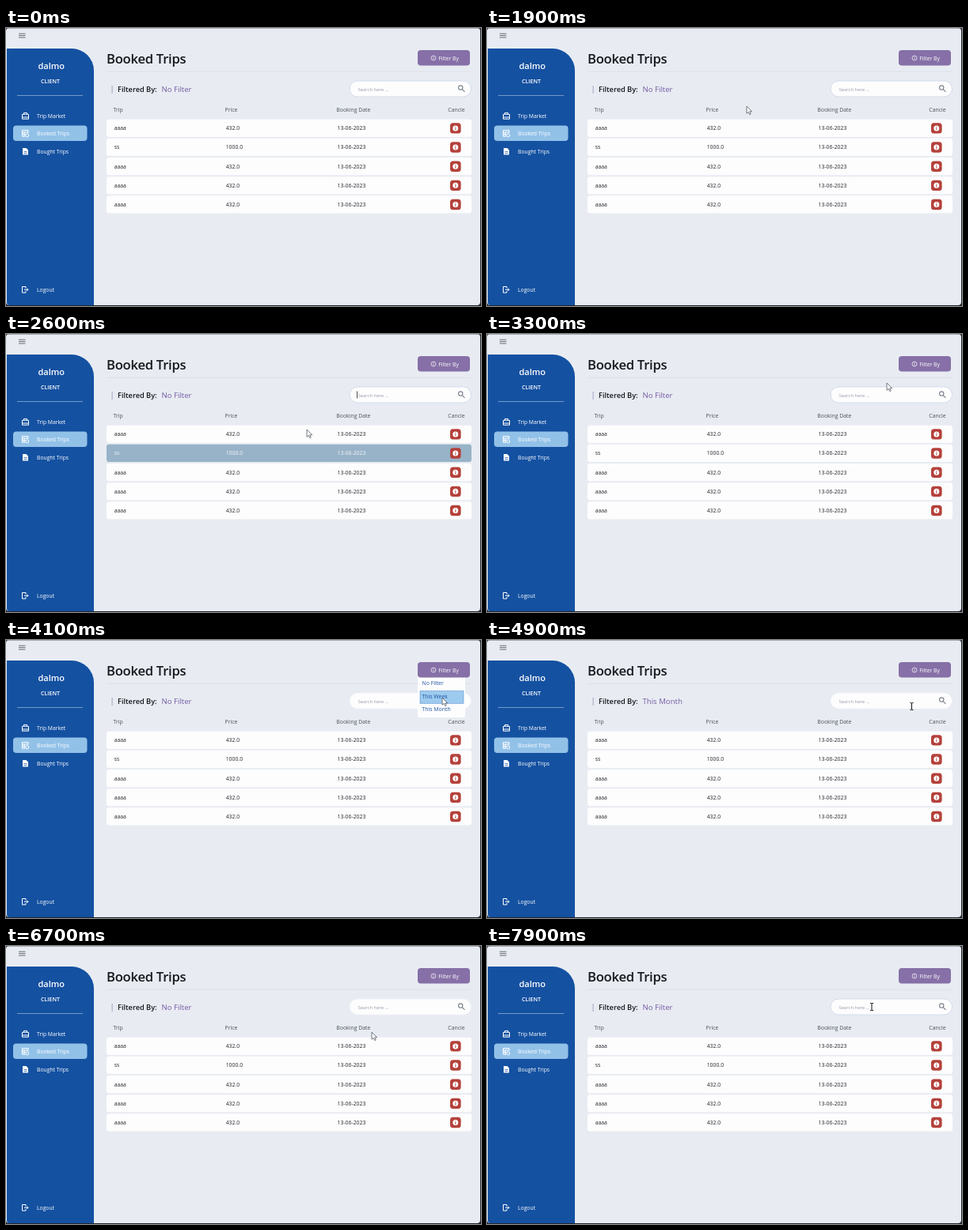
Animation of 600x352 px, one loop 8 s. Source, as an HTML page:

```html
<!DOCTYPE html>
<html lang="en">
<head>
<meta charset="utf-8">
<title>Booked Trips</title>
<style>
  html, body { margin: 0; width: 100%; height: 100%; overflow: hidden; background: #20242c; }
  svg { display: block; width: 600px; height: 352px; font: 6.8px "Open Sans", "Noto Sans", sans-serif; }
  .semi { font-weight: 600; }
  .mid { text-anchor: middle; }
  .icon { fill: none; stroke: #fff; stroke-width: 1; }
  .row rect:first-child { fill: #fdfdfe; }
  .row text { fill: #24262b; }
  .row.hover rect:first-child { fill: #98b3c8; }
  .row.hover text { fill: #f2f6fa; }
</style>
</head>
<body>
<svg viewBox="0 0 600 352">
  <!-- window -->
  <rect width="599" height="351" rx="4" fill="#e8ecf2"/>
  <path d="M0 0H600V.6H0Z" fill="#6b7078"/>
  <path d="M16 7.2h8.5M16 9.6h8.5M16 12h8.5" stroke="#666b73" stroke-width="1"/>

  <!-- sidebar -->
  <path d="M1 26H83A28 28 0 0 1 111 54V351H4Q1 351 1 347Z" fill="#1451a1"/>
  <g fill="#fff">
    <text class="semi mid" x="57.3" y="52" font-size="11">dalmo</text>
    <text class="semi mid" x="56" y="69.6" font-size="7.1">CLIENT</text>
    <path d="M14 85.2H97V85.9H14Z" opacity=".55"/>
    <rect x="9" y="123.5" width="93.5" height="19.5" rx="4" fill="#92c1e8"/>
    <text x="39" y="113.5">Trip Market</text>
    <text x="39" y="136">Booked Trips</text>
    <text x="39" y="158.7">Bought Trips</text>
    <text x="39" y="333.5">Logout</text>
    <path d="M21 152h4.5l2.5 2.5v6h-7Z"/>
  </g>
  <path d="M22.5 156.5h4M22.5 158.6h4" stroke="#1451a1" stroke-width=".7"/>
  <g class="icon">
    <path d="M20.5 109.3h8v5.9h-8ZM22.5 109v-1.6h4V109M20.5 113h8"/>
    <path d="M24 137.2h-3.5v-7.6h7.5v3M20.5 132h7.5M20.5 134.5h4M23 132v5"/>
    <circle cx="26.7" cy="135.9" r="2"/>
    <path d="M25 329.5v-2h-4.5v7.6H25v-2M23 331.3h5M26.3 329.6l1.7 1.7-1.7 1.7"/>
  </g>

  <!-- heading -->
  <text class="semi" x="127" y="45" font-size="16.6" letter-spacing="-.25" fill="#14161b">Booked Trips</text>
  <path d="M127 54.7H587V55.5H127Z" fill="#d8dce4"/>
  <path d="M133.6 73H134.6V83H133.6Z" fill="#a99fc4"/>
  <text class="semi" x="141" y="81" font-size="9.2" fill="#14161b">Filtered By:</text>
  <text id="filter" x="196.5" y="81" font-size="9.6" font-weight="500" fill="#7559a3"></text>

  <!-- search -->
  <rect id="search" x="434" y="67" width="153.5" height="20" rx="10" fill="#fdfdfe" stroke-width=".8"/>
  <text x="444.5" y="79.6" font-size="5.9" fill="#9a9fa9">Search here ...</text>
  <path id="caret" d="M443.2 72.5H444V81.5H443.2Z" fill="#222"/>
  <g fill="none" stroke="#7c828c" stroke-width="1.1">
    <circle cx="574.2" cy="75.6" r="2.7"/>
    <path d="M576.2 77.6l3.3 3.3"/>
  </g>

  <!-- table -->
  <g fill="#4c515b" font-size="6.9">
    <text x="135.5" y="105.8">Trip</text>
    <text x="276.5" y="105.8">Price</text>
    <text x="417.3" y="105.8">Booking Date</text>
    <text x="558.3" y="105.8">Cancle</text>
  </g>
  <g id="rows" font-size="6.85"></g>

  <!-- drop-down -->
  <g id="menu" fill="#1f55a5" font-size="6.9">
    <rect x="520" y="44" width="60" height="54" rx="2" fill="#fdfdfe"/>
    <rect id="choice" x="523" width="55" height="16" fill="#9dcbef" stroke="#2d6eb5" stroke-width=".8" stroke-dasharray="1 1"/>
    <text x="525.5" y="57.2">No Filter</text>
    <text x="525.5" y="73.7">This Week</text>
    <text x="525.5" y="90">This Month</text>
  </g>
  <rect x="520" y="28" width="66" height="19.5" rx="4" fill="#8670a7"/>
  <circle cx="540" cy="38" r="3" fill="none" stroke="#fff" stroke-width=".7"/>
  <path d="M539.6 36.3h.8v.8h-.8ZM539.6 37.6h.8v2h-.8Z" fill="#fff"/>
  <text x="546.3" y="40.5" fill="#fff">Filter By</text>

  <!-- pointers -->
  <path id="arrow" d="M0 0V9.3L2.2 7.3 3.7 10.6 5.2 9.9 3.8 6.8H6.7Z" fill="#fff" stroke="#555a62" stroke-width=".8"/>
  <path id="beam" d="M-2-4.5H-.6L0-4 .6-4.5H2M0-4V4M-2 4.5H-.6L0 4 .6 4.5H2" fill="none" stroke="#111" stroke-width="1"/>
</svg>
<script>
const $ = id => document.getElementById(id);
const LOOP = 8000, STEP = 100;
const ROW_TOP = 115.7, PITCH = 24.15, ROW_H = 22.2;
const trips = [["aaaa", "432.0"], ["ss", "1000.0"], ["aaaa", "432.0"], ["aaaa", "432.0"], ["aaaa", "432.0"]];

$("rows").innerHTML = trips.map(([trip, price], i) => `
  <g class="row" transform="translate(0 ${ROW_TOP + i * PITCH})">
    <rect x="127" width="461" height="${ROW_H}" rx="3"/>
    <text x="136.7" y="13.6">${trip}</text>
    <text x="277.7" y="13.6">${price}</text>
    <text x="418.6" y="13.6">13-06-2023</text>
    <rect x="561" y="4.5" width="13.6" height="13.4" rx="3.5" fill="#b5413b"/>
    <circle cx="567.8" cy="11.2" r="3.5" fill="#fff"/>
    <path d="M567.3 9h1v1h-1ZM567.3 10.7h1v2.7h-1Z" fill="#b5413b"/>
  </g>`).join("");
const rows = [...document.querySelectorAll(".row")];

// pointer path: time, x, y
const path = [
  [200, 420, 8], [1000, 300, 62], [1900, 328, 99], [2250, 360, 144], [2450, 378, 150],
  [2600, 380, 121], [2900, 440, 78], [3300, 505, 62], [3700, 552, 40], [4100, 551, 73],
  [4200, 551, 73], [4600, 553, 88], [5200, 520, 80], [5500, 569, 83], [5850, 553, 39],
  [6250, 540, 55], [6700, 462, 109], [7200, 430, 104], [7900, 486, 77], [8000, 486, 77]
];

function pointerAt(t) {
  const i = Math.max(1, path.findIndex(p => p[0] >= t));
  const [t0, x0, y0] = path[i - 1], [t1, x1, y1] = path[i];
  const k = Math.min(1, Math.max(0, (t - t0) / (t1 - t0)));
  const e = k * k * (3 - 2 * k);
  return [x0 + (x1 - x0) * e, y0 + (y1 - y0) * e];
}

const within = (t, a, b) => t >= a && t < b;
const show = (el, on) => el.style.display = on ? "" : "none";

function draw(t) {
  const [x, y] = pointerAt(t);
  const visible = t >= 200;
  const open = within(t, 3800, 4700) || within(t, 5900, 6300);
  const focused = t < 3800 || within(t, 5250, 5900) || t >= 7850;
  const typing = !open && within(x, 434, 562) && within(y, 67, 87);

  $("filter").textContent = within(t, 4700, 6300) ? "This Month" : "No Filter";
  $("search").setAttribute("stroke", focused ? "#cbd5e6" : "#eef1f6");
  show($("caret"), t < 3800 && (t + 900) % 1060 < 530);

  show($("menu"), open);
  const choice = Math.floor((y - 47.5) / 16.5);
  show($("choice"), choice >= 0 && choice < 3);
  $("choice").setAttribute("y", 48 + choice * 16.4);

  // row highlight trails the pointer slightly
  const hoverY = pointerAt(t - 120)[1] - ROW_TOP;
  rows.forEach((row, i) => row.classList.toggle("hover", visible && within(hoverY - i * PITCH, 0, ROW_H)));

  for (const id of ["arrow", "beam"]) {
    show($(id), visible && typing === (id === "beam"));
    $(id).setAttribute("transform", `translate(${x} ${y})`);
  }
}

const start = performance.now();
function tick() {
  const t = (performance.now() - start) % LOOP;
  draw(Math.floor(t / STEP) * STEP);
  requestAnimationFrame(tick);
}
tick();
</script>
</body>
</html>
```
